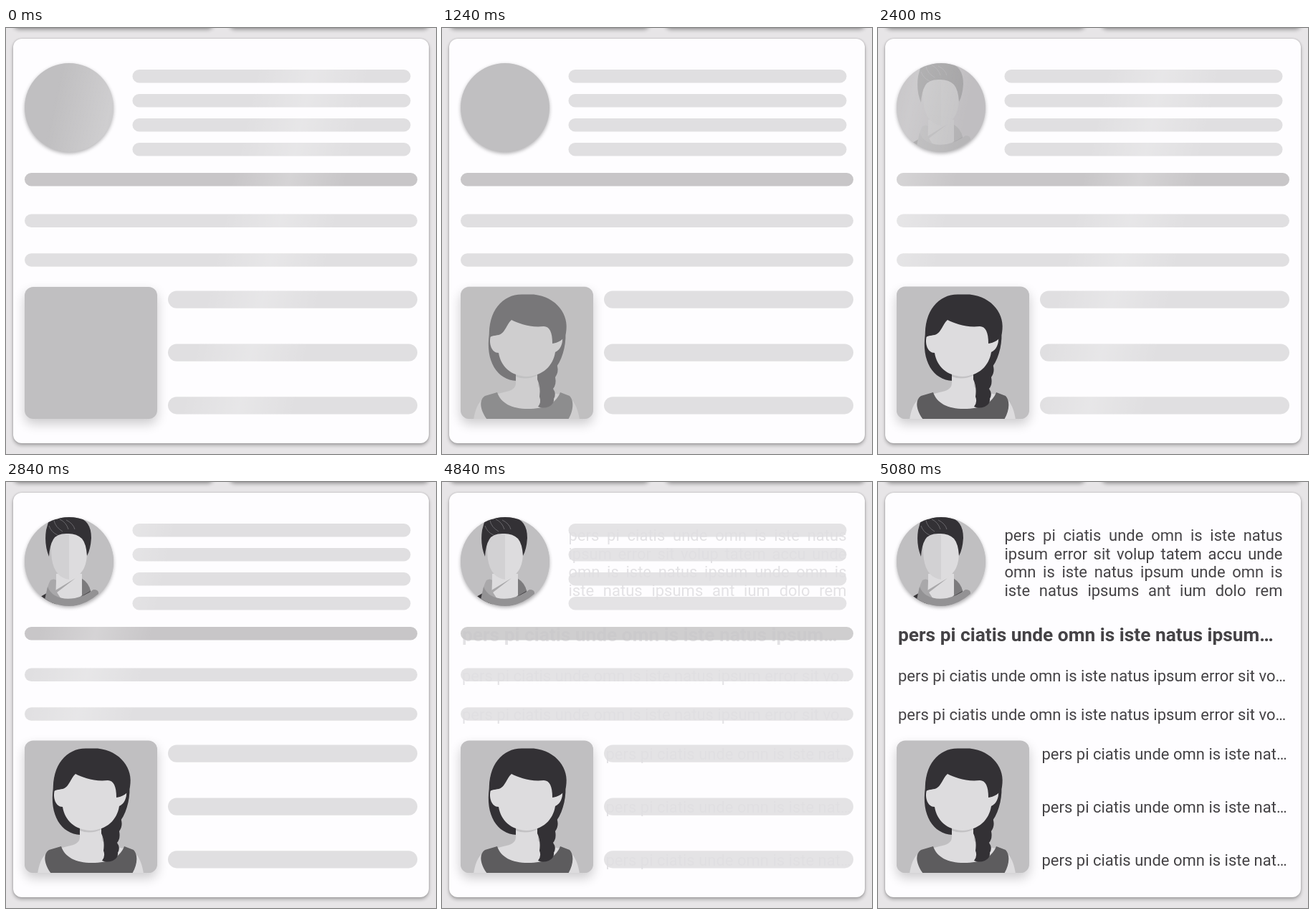
An HTML page that plays this animation: 600x594 px, repeating every 5400 ms.

```html
<!DOCTYPE html>
<html lang="en">
<head>
<meta charset="utf-8">
<title>Skeleton card</title>
<style>
html, body { margin: 0; width: 100%; height: 100%; overflow: hidden; background: #e7e5e7; }
body { position: relative; font: 22px/26px Roboto, sans-serif; color: #454346; }
.card { position: absolute; left: 10px; top: 15px; width: 580px; height: 564px; border-radius: 12px;
  background: #fefdff; box-shadow: 0 3px 5px rgba(0,0,0,.27), 0 0 3px rgba(0,0,0,.2); }
.above { top: -60px; height: 60px; width: 284px; }
p { position: absolute; margin: 0; left: 28px; white-space: nowrap; }
.intro { left: 176.5px; top: 62px; width: 388px; line-height: 25.7px; text-align: justify; text-align-last: justify; }
.title { top: 197.5px; font-size: 26.3px; line-height: 30px; font-weight: bold; }
.side { left: 228.5px; }
svg { position: absolute; left: 0; top: 0; }
.round { position: absolute; background: #c0bfc1; }
#disc { left: 26px; top: 49px; width: 124px; height: 124px; border-radius: 50%; box-shadow: 0 2px 5px rgba(0,0,0,.3); }
#tile { left: 26px; top: 360.5px; width: 184.5px; height: 184.5px; border-radius: 12px; box-shadow: 0 7px 16px rgba(0,0,0,.2); }
</style>
</head>
<body>
<div class="card above" style="left:8px"></div>
<div class="card above" style="left:309px"></div>
<div class="card"></div>
<div class="round" id="disc"></div>
<div class="round" id="tile"></div>

<div id="text">
  <p class="intro">pers pi ciatis unde omn is iste natus<br>ipsum error sit volup tatem accu unde<br>omn is iste natus ipsum unde omn is<br>iste natus ipsums ant ium dolo rem</p>
  <p class="title">pers pi ciatis unde omn is iste natus ipsum…</p>
  <p style="top:257.5px">pers pi ciatis unde omn is iste natus ipsum error sit vo…</p>
  <p style="top:312.3px">pers pi ciatis unde omn is iste natus ipsum error sit vo…</p>
  <p class="side" style="top:367.3px">pers pi ciatis unde omn is iste nat…</p>
  <p class="side" style="top:441px">pers pi ciatis unde omn is iste nat…</p>
  <p class="side" style="top:514.8px">pers pi ciatis unde omn is iste nat…</p>
</div>

<svg width="600" height="594" viewBox="0 0 600 594">
  <defs>
    <linearGradient id="glow">
      <stop offset="0" stop-color="#fff" stop-opacity="0"/>
      <stop offset=".5" stop-color="#fff" stop-opacity=".24"/>
      <stop offset="1" stop-color="#fff" stop-opacity="0"/>
    </linearGradient>
    <clipPath id="barClip"></clipPath>
    <clipPath id="discClip"><circle cx="88" cy="111" r="62"/></clipPath>
    <clipPath id="tileClip"><rect x="26" y="360.5" width="184.5" height="184.5" rx="12"/></clipPath>
    <rect id="band" x="-80" width="160" height="594" fill="url(#glow)"/>
  </defs>

  <g id="bars"></g>
  <g id="shine" clip-path="url(#barClip)"><use href="#band" id="first"/><use href="#band" id="second"/></g>
  <g id="discShine" clip-path="url(#discClip)"><use href="#band" id="third"/></g>

  <g id="man" clip-path="url(#discClip)">
    <path fill="#c0bfc1" d="M26 49h124v124H26z"/>
    <path fill="#39373a" d="M48 160l14-8 10 22H48zM104 136q14 8 15 22l-14 4z"/>
    <path fill="#7c7b7d" d="M105 134q11 7 13 18l-14 8z"/>
    <path fill="#dddcde" d="M70 128h36v30q-12 10-28 8l-8-14z"/>
    <path fill="#a9a8aa" d="M62 137q5-3 8 0l-1 14 28-17-26 20 8 12-18 2q-8-15 1-31z"/>
    <path fill="#939294" d="M58 146q8 20 38 16 14-3 26-12 8 0 7 6-18 16-42 18-24-2-33-10z"/>
    <path fill="#dddcde" d="M87 66h26q1 30-1 44-4 22-25 26z"/>
    <path fill="#d2d1d3" d="M88 66v70q-20-3-24-28-2-14-1-42z"/>
    <path fill="#333135" d="M60 104q-7-17-4-37l3-11 6-5 6 1q10-6 28-3 20 4 20 29-1 16-6 25-1-17-7-24-8-8-22-7-13 0-18 8-5 8-6 24z"/>
    <path fill="none" stroke="#777579" stroke-width=".8" d="M60 61q3 9 12 13M67 54q2 9 12 15M75 52q9 4 12 14M84 53q10 5 12 13M62 52q6-5 10 0"/>
  </g>

  <g id="woman" clip-path="url(#tileClip)">
    <path fill="#c0bfc1" d="M26 360h185v186H26z"/>
    <path fill="#333135" d="M66 426C60 464 77 491 104 492L134 480 160 472C170 458 174 436 172 420z"/>
    <path fill="#dddcde" d="M44 546Q48 520 62 514L90 507Q103 504 103 495V470H134V500Q138 506 150 508L174 513Q188 520 192 546z"/>
    <path fill="#c3c2c4" d="M103 480Q118 488 134 481V484Q118 492 103 486z"/>
    <path fill="#5d5c5e" d="M63 546C52 531 52 518 60 513L77 508C82 523 97 531 120 531S159 524 165 508L178 513C185 520 183 535 176 546z"/>
    <path fill="#333135" d="M133 478L156 455 161 472Q163 480 158 487 160 497 155 503 160 510 156 517 157 524 149 528 141 531 134 528 139 522 136 514 138 500 133 490z"/>
    <path fill="#dddcde" d="M82 426L68 429C65 440 69 453 79 453 82 472 96 485 118 486 141 485 155 471 158 452 165 449 169 440 168 431L155 438 152 405H98z"/>
    <path fill="#333135" d="M66 432C64 394 85 371 112 371.500H128C160 375 178 400 173 425 171 435 161 439 154 440 154 424 150 416 142 416 122 418 107 412 97 407 90 413 88 426 79 428 73 429 69 429 66 432z"/>
  </g>
</svg>

<script>
const LOOP = 5400, STEP = 40;
const $ = id => document.getElementById(id);
const NS = 'http://www.w3.org/2000/svg';

function addRect(parent, x, y, w, h, r, fill) {
  const el = document.createElementNS(NS, 'rect');
  const attrs = { x, y, width: w, height: h, rx: r, fill };
  for (const k in attrs) el.setAttribute(k, attrs[k]);
  parent.append(el);
}

function addBar(x, y, w, h, fill = '#e0dfe1') {
  addRect($('bars'), x, y, w, h, h / 2, fill);
  addRect($('barClip'), x, y, w, h, h / 2, fill);
}

for (const y of [58, 92, 126, 160]) addBar(176.5, y, 388, 18.5);
addBar(26, 202, 548, 18.5, '#c8c6c8');
for (const y of [259.5, 314.2]) addBar(26, y, 548, 18.5);
for (const y of [366.5, 440.5, 514.2]) addBar(226, y, 348, 24.2);
addRect($('barClip'), 26, 360.5, 184.5, 184.5, 12);

// Piecewise linear value through time, value pairs; held at both ends.
function key(t, ...k) {
  if (t <= k[0]) return k[1];
  for (let i = 2; i < k.length; i += 2) {
    if (t <= k[i]) return k[i - 1] + (k[i + 1] - k[i - 1]) * (t - k[i - 2]) / (k[i] - k[i - 2]);
  }
  return k[k.length - 1];
}

// Slanted band whose centre crosses height y at x.
const place = (id, x, y) =>
  $(id).setAttribute('transform', `translate(${x + 0.22 * y}) skewX(-12.4)`);
const fade = (id, a) => { $(id).style.opacity = a; };

function draw(now) {
  const t = Math.floor(now % LOOP / STEP) * STEP;
  const early = t < 2000;
  const reveal = key(t, 4800, 0, 5080, 1);

  place('first', early ? key(t, 80, 395, 640, 630) : key(t, 2160, -120, 2400, 365, 2640, 830), 211);
  place('second', early ? key(t, 80, -120, 640, 295) : key(t, 2160, -120, 2400, 30, 2720, 125), 211);
  fade('shine', early ? key(t, 1040, 1, 1200, 0) : +(t < 4840));

  place('third', t < 1560 ? key(t, 640, 145, 880, 190, 1240, 260) : key(t, 1560, -70, 2120, 45), 111);

  fade('woman', key(t, 1040, 0, 1320, 1) ** 2);
  fade('man', key(t, 2160, 0, 2720, 1) ** 2);
  fade('text', reveal);
  fade('bars', 1 - reveal);
  requestAnimationFrame(draw);
}
requestAnimationFrame(draw);
</script>
</body>
</html>
```
